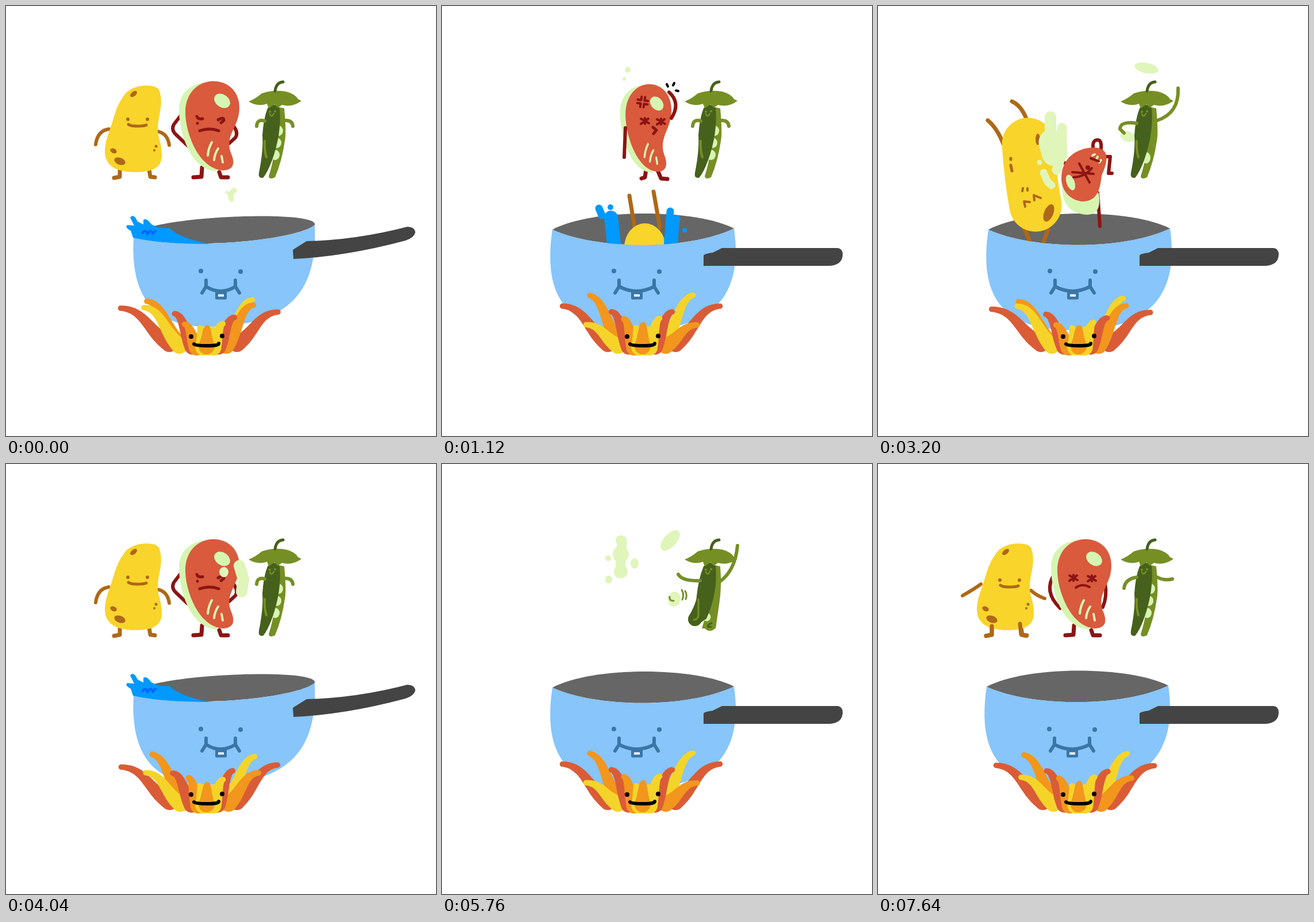
These frames come from a looping animation (748x748 px, 7680 ms). An HTML page with a canvas:

```html
<!DOCTYPE html>
<html lang="en">
<head>
<meta charset="utf-8">
<title>Vegetable soup</title>
<style>
html, body { margin: 0; width: 100%; height: 100%; overflow: hidden; background: #fff; }
canvas { display: block; width: 748px; height: 748px; }
</style>
</head>
<body>
<canvas id="stage" width="748" height="748"></canvas>
<script>
const g = document.getElementById('stage').getContext('2d');
const RED = '#d95a3c', MAROON = '#8b1414', MINT = '#d6f5b1', STEAM = '#e0f5ba';
const YELLOW = '#f9d42b', BROWN = '#ae6817', LEAF = '#768f25', DARK = '#46611b';
const SKY = '#87c5fa', BLUE = '#3a76a6', WATER = '#0099ff';
g.lineCap = g.lineJoin = 'round';

const mix = (a, b, u) => a + (b - a) * u;
const cubic = (a, b, c, d, t) =>
  a * (1 - t) ** 3 + 3 * b * t * (1 - t) ** 2 + 3 * c * t * t * (1 - t) + d * t ** 3;

function fill(color, path) {
  g.fillStyle = color;
  g.fill(new Path2D(path));
}
function line(color, width, path) {
  g.strokeStyle = color;
  g.lineWidth = width;
  g.stroke(new Path2D(path));
}
function dot(color, x, y, rx, ry = rx, deg = 0) {
  g.beginPath();
  g.ellipse(x, y, rx, ry, deg * Math.PI / 180, 0, 7);
  g.fillStyle = color;
  g.fill();
}
function moved(x, y, draw, sx = 1, sy = 1) {
  g.save();
  g.translate(x, y);
  g.scale(sx, sy);
  draw();
  g.restore();
}
// Draw a pose whose centre is (cx, cy) at (x, y), turned by deg
function turned(draw, cx, cy, x, y, deg) {
  g.save();
  g.translate(x, y);
  g.rotate(deg * Math.PI / 180);
  g.translate(-cx, -cy);
  draw();
  g.restore();
}

// ---- Pot: left corner, rim curves, bowl, handle, face ----
const LEVEL = {
  left: 'M192 389', back: 'C260 352 440 352 508 387', front: 'C430 425 270 425 192 389',
  bowl: 'C175 505 215 564 340 564 C470 564 525 505 508 387',
  handle: 'M455 434 Q456 431 471 429 L487 421 H688 Q697 422 697 432 Q697 450 675 452 H455 Z',
  face: [299, 79]
};
const TILT = {
  left: 'M222 402', back: 'C220 366 548 352 537 381', front: 'C500 410 300 425 222 402',
  bowl: 'C215 520 270 557 350 558 C500 557 542 490 537 381',
  handle: 'M499 424 L523 409 Q610 407 698 384 Q711 384 712 394 Q710 403 695 408 Q590 436 500 440 Z',
  face: [339, 69]
};
function face(x, w) {
  const a = x + 9, b = x + w - 9, mid = x + w / 2;
  dot(BLUE, x, 461, 4);
  dot(BLUE, x + w, 462, 4);
  line(BLUE, 6, `M${a} 477 V488 L${a - 7} 499 M${a} 488 Q${mid} 504 ${b} 488 M${b} 477 V488 L${b + 7} 499`);
  g.fillStyle = '#fff';
  g.fillRect(mid - 7, 499, 15, 9);
  g.lineWidth = 5;
  g.strokeRect(mid - 7, 499, 15, 9);
}
function wave(k) {
  fill(WATER, 'M221 403 L217 391 Q206 385 211 381 L223 382 L216 368 Q220 362 225 368 L229 375 L239 380 V372 Q245 368 252 379 Q265 388 284 386 Q300 403 354 414 Q270 414 221 403');
  line('#0066ff', 4, 'M237 395 Q244 387 246 397 Q252 386 255 396 L260 391');
  const fly = k % 31 - 2;
  if (fly > 0 && fly < 4) dot(WATER, 209 - 36 * fly, 372 + fly * fly * 5, 9, 6, -30);
}
function splash() {
  line(WATER, 24, 'M294 368 L299 412 M401 378 L398 412');
  line(WATER, 13, 'M273 352 L278 364 M397 357 L395 380 M408 370 L404 390');
  dot(WATER, 293, 350, 5);
  dot(WATER, 422, 390, 4);
}

// ---- Flames: mirrored tongues, from the outside in ----
const FIRE = ['#d95c37', '#f2961d', '#f5d42a'];
const REACH = [140, 92, 99, 54, 32], TOP = [521, 502, 558, 531, 543];

function tongue(color, reach, top, foot = 588) {
  const tall = foot - top;
  g.beginPath();
  for (let t = 0; t <= 1; t += 1 / 40) {
    const x = 348 + reach * cubic(.42, .67, .7, 1, t);
    const y = cubic(foot, foot - tall * .35, top + Math.max(0, tall - 70) * .3, top, t);
    const r = mix(14, 4.5, t ** .8);
    g.moveTo(x + r, y);
    g.arc(x, y, r, 0, 7);
  }
  g.fillStyle = color;
  g.fill();
}
function fire(k) {
  const lean = (1 + Math.cos(k * Math.PI / 5)) / 2;
  REACH.forEach((reach, i) => {
    const top = TOP[i] - lean * (i === 2 ? 34 : -8);
    for (const side of [-1, 1]) {
      const hue = side > 0 && i % 3 ? 3 - i % 3 : i % 3;
      const flick = 4 * Math.sin(k * 1.9 + i * 2 + side);
      tongue(FIRE[hue], side * (reach + flick * lean) - lean * reach * .11, top + flick * lean, 588 + i * 1.5);
    }
  });
  tongue(FIRE[2], -11, 560, 594);
  tongue(FIRE[2], 12, 562, 594);
  tongue(FIRE[1], 2, 554 + lean * 6, 592);
  dot('#000', 322, 575, 4);
  dot('#000', 376, 574, 4);
  line('#000', 6, 'M327 588 Q330 591 350 591 Q370 591 370 587');
}

// ---- Potato ----
function potato(armsOut) {
  line(BROWN, 6, armsOut
    ? 'M179 209 Q165 219 147 229 M266 220 Q276 229 290 234'
    : 'M179 214 Q159 217 156 241 M263 218 Q281 221 284 242');
  line(BROWN, 7, 'M198 285 V297 L188 299 M249 285 L251 297 L259 298');
  fill(YELLOW, 'M208 152 C224 134 265 135 267 148 C276 175 260 200 265 225 C277 268 275 289 225 289 C162 289 168 250 179 220 C190 190 190 175 208 152');
  dot(BROWN, 222, 153, 7, 4, -40);
  dot(BROWN, 187, 252, 6, 4, 25);
  dot(BROWN, 198, 270, 10, 6, 20);
  dot(BROWN, 261, 244, 2.5);
  dot(BROWN, 258, 251, 2);
  if (armsOut) line(BROWN, 7, 'M198 282 V297 L188 299 M247 278 L249 297 L258 299');
  moved(0, armsOut ? 5 : 0, () => {
    dot(BROWN, 212, 197, 3);
    dot(BROWN, 246, 197, 3);
    line(BROWN, 5, 'M213 206 Q217 209 228 209 Q240 209 244 207');
  });
}
function potatoFlipped() {
  line(BROWN, 7, 'M218 240 Q207 212 191 199 M258 196 Q249 173 233 166 M255 388 L265 411 M296 388 L288 411');
  line(YELLOW, 91, 'M261 240 Q265 300 274 347');
  dot(BROWN, 297, 360, 8, 16, 22);
  dot(BROWN, 278, 232, 4, 10);
  line(BROWN, 5, 'M231 265 V267 M231 277 L233 287');
  line(BROWN, 4, 'M251 322 L252 317 M260 321 V317 M272 338 L271 329 L283 334 M256 349 L254 340 L264 341');
}
function drawPotato(c) {
  if (c < 6) potato(false);
  else if (c < 11) {
    const u = (c - 6) / 5;
    turned(potatoFlipped, 268, 293, mix(222, 345, u), mix(215, 400, u) - 60 * Math.sin(u * Math.PI), mix(180, 360, u));
  } else if (c < 17) {
    moved(0, (c - 14) * (c > 14 ? 18 : 5), () => {
      line(BROWN, 7, 'M326 330 L335 385 M368 323 L379 385');
      dot(YELLOW, 353, 420, 36, 42);
    });
    if (c < 16) splash();
  } else if (c >= 38 && c < 40) moved(-12 * (c - 40), -60 * (c - 40), potatoFlipped);
  else if (c >= 40 && c < 43) {
    const u = (c - 40) / 3;
    turned(potatoFlipped, 268, 293, mix(268, 222, u), mix(293, 215, u), 180 * u);
  } else if (c >= 43) potato(true);
}

// ---- Red bean ----
function cross(x, y) {
  line(MAROON, 4, `M${x - 7} ${y - 5} l14 8 M${x - 7} ${y + 4} l13 -9 M${x} ${y - 6} v10`);
}
function beanBody() {
  fill(MINT, 'M301 180 C301 145 330 132 355 132 L367 288 C320 285 301 220 301 180');
  fill(RED, 'M312 185 C312 114 406 114 406 177 C406 210 380 225 391 255 C400 275 395 285 378 286 C335 284 312 220 312 185');
  dot(MINT, 376, 165, 15, 11, 35);
  line(MINT, 4, 'M358 237 Q352 248 351 260 M369 248 Q363 257 362 268 M375 261 L377 272');
}
function bean(dazed) {
  line(MAROON, 6, dazed
    ? 'M308 190 Q286 221 317 251 M395 208 Q399 230 391 249'
    : 'M308 185 L292 206 Q287 215 295 223 L316 243 M395 208 Q405 220 399 229 L388 239');
  line(MAROON, 7, 'M341 281 L340 297 L326 298 M371 289 L374 298 H386');
  beanBody();
  if (dazed) {
    cross(340, 199);
    cross(372, 200);
    line(MAROON, 4, 'M344 215 Q356 207 368 214');
  } else {
    line(MAROON, 5, 'M332 192 Q334 198 342 196 M369 198 Q379 192 379 199 L374 203 M337 217 Q354 211 370 217');
    dot(MAROON, 333, 204, 2.5);
  }
}
function beanAngry(k) {
  line(MAROON, 7, 'M355 285 L353 298 L347 300 M376 288 L381 300 L392 301');
  moved(54, 8, beanBody, .85, .98);
  line(MAROON, 6, 'M319 212 L317 263 ' + (k % 2 ? 'M396 160 Q415 172 398 195' : 'M395 150 Q416 169 399 195'));
  cross(353, 201);
  cross(381, 202);
  line(MAROON, 5, 'M367 211 L373 216 L368 222');
  for (let i = 0; i < 4; i++) turned(() => line(MAROON, 4, 'M3 -9 V-3 H9'), 0, 0, 349, 167, i * 90 + 8);
  if (k % 2 === 0) line('#000', 4, 'M391 136 l2 4 M404 134 l-2 4 M407 147 l4 1');
}
function beanFlipped() {
  line(MAROON, 6, 'M374 246 Q373 233 382 233 Q391 233 387 256 M395 262 H404 L401 291 H407 M330 275 L325 273 M382 325 L386 383');
  fill(MINT, 'M320 312 L384 325 C389 358 376 363 362 363 C335 361 320 345 320 312');
  fill(RED, 'M319 300 C319 265 345 247 375 246 C405 247 400 270 389 295 C386 325 378 340 355 340 C335 338 319 322 319 300');
  dot(MINT, 335, 307, 7, 14, -20);
  line(MINT, 4, 'M373 260 L377 258 M380 267 L382 262 M385 272 L388 268');
  line(MAROON, 4, 'M338 289 L375 292 M350 274 L368 307 M340 298 Q360 297 372 282 M370 265 L384 270');
  dot(MAROON, 365, 281, 4);
}
function drawBean(c) {
  if (c < 8) bean(false);
  else if (c < 17) beanAngry(Math.floor(c));
  else if (c < 21) {
    const u = (c - 17) / 4;
    turned(beanFlipped, 358, 300, mix(355, 345, u), mix(215, 450, u) - 40 * Math.sin(u * Math.PI), mix(180, 360, u));
  } else if (c >= 38 && c < 40) moved(0, -60 * (c - 40), beanFlipped);
  else if (c >= 40 && c < 43) {
    const u = (c - 40) / 3;
    turned(beanFlipped, 358, 300, 358, mix(300, 215, u), 180 * u);
  } else if (c >= 43) bean(true);
}

// ---- Pea pod ----
function thrownPea(step) {
  const x = 404 - 14 * step, y = 235 + 33 * step + 3 * step * step;
  dot(STEAM, x, y, 11, 13, 15);
  line(LEAF, 3, `M${x - 8} ${y - 4} q-1 7 7 7`);
  if (step < 2) line(LEAF, 3, `M${x + 13} ${y - 16} q5 8 1 17 M${x + 19} ${y - 14} q4 7 1 14`);
}
function drawPod(k) {
  const dancing = k >= 20 && k < 34, juggling = k >= 34 && k < 43, odd = k % 2;
  let arms = 'M450 200 Q437 196 436 209 M484 199 Q498 198 499 209';
  if (k >= 43) arms = 'M450 197 Q430 200 428 216 M484 196 Q498 204 512 200';
  if (juggling) arms = 'M450 204 Q421 200 421 214 L428 221 M486 199 Q524 186 522 143';
  if (dancing) arms = odd
    ? 'M414 172 Q419 204 448 203 M485 203 Q501 192 506 135'
    : 'M411 192 Q418 204 449 203 M484 204 Q510 185 514 142';

  if (dancing) {
    const bend = odd ? 0 : 14, step = (k - 18) % 6;
    if (step < 5) thrownPea(step);
    if (step === 0) dot(STEAM, 397, 133, 22, 11, -48);
    fill(LEAF, `M470 175 L484 178 Q487 215 482 245 L476 ${272 + bend} H452 Q470 230 470 175`);
    dot(LEAF, 473 - bend / 2, 268 + bend * .8, 11);
    dot(MINT, 453 + bend / 2, 266, 11 - bend / 4);
    line(DARK, 3, `M${476 - bend / 2} ${263 + bend} q-8 2 -6 7 l5 -1`);
    fill(DARK, `M455 178 Q465 165 476 178 Q480 225 460 ${255 + bend} L441 ${268 + bend} L430 ${250 + bend} Q443 240 443 230 Q446 200 455 178`);
    dot(DARK, 440, 256 + bend, 12);
    line(LEAF, 3, `M446 235 V${250 + bend} q-2 7 -8 7`);
  } else {
    fill(LEAF, 'M470 175 L484 178 Q488 220 485 235 Q480 270 468 298 Q458 303 457 296 Q472 250 468 200 Z');
    if (juggling) {
      dot(STEAM, 434, 227, 13, 9, 20);
      if (!odd) dot(STEAM, 467, 108, 21, 9, 12);
      dot(MINT, 466, 264, 8, 10);
    } else for (let i = 0; i < 3; i++) dot(MINT, 474 - i * 3, 217 + i * 21, 8, 9);
    fill(DARK, 'M455 178 Q465 165 476 178 Q480 220 463 268 Q455 290 447 299 Q438 300 440 290 Q448 250 446 225 Q448 195 455 178');
    line(LEAF, 4, 'M450 235 Q449 251 453 263');
  }
  line(LEAF, 6, arms);
  fill(LEAF, 'M422 166 Q433 162 445 152 Q466 145 488 149 Q503 153 508 162 L514 165 Q498 177 480 172 L473 177 L467 171 L457 178 L454 170 Q438 176 422 166');
  line(DARK, 5, 'M468 148 Q470 133 482 132');
  dot(LEAF, 459, 184, 2);
  dot(LEAF, 468, 183, 2);
  line(LEAF, 2.5, 'M459 188 Q462 195 466 187');
}

// ---- Steam: puffs swell into plumes, then break up ----
function puff() {
  dot(STEAM, 384, 324, 2.5);
  line(STEAM, 9, 'M397 321 L390 327 L392 336');
}
function plume(wide) {
  line(STEAM, 20, 'M300 193 V230');
  line(STEAM, 45, 'M302 237 L307 256');
  line(STEAM, 17, 'M320 212 V255 L311 285');
  line(STEAM, 13, 'M288 290 L295 306 L302 312');
  if (wide) line(STEAM, 17, 'M343 212 L329 248');
  dot(STEAM, 281, 272, 4.5);
}
function wisps() {
  line(STEAM, 17, 'M313 133 L310 188');
  for (const [y, r] of [[133, 9], [157, 14], [187, 12]]) dot(STEAM, 311, y, r);
  dot(STEAM, 289, 164, 5);
  dot(STEAM, 335, 173, 7, 9);
  dot(STEAM, 290, 201, 6, 7);
}
function scraps() {
  line(STEAM, 20, 'M406 177 L413 200 L410 222');
  dot(STEAM, 379, 188, 8, 9);
}
function specks() {
  dot(STEAM, 323, 111, 5);
  dot(STEAM, 317, 127, 3);
}
function steam(n) {
  const s = n % 15;
  if (n > 91) return;
  if (s < 2) moved(0, -12 * s, puff);
  else if (s < 5) moved(95, 12 * (3 - s), () => plume(n % 2));
  else if (s < 7) moved(0, 30 * (5 - s), scraps);
  else if (s < 8) moved(85, 0, specks);
  else if (s < 9) moved(-95, 0, puff);
  else if (s < 12) moved(0, 22 * (10 - s), () => plume(n % 2));
  else if (s < 14) moved(0, 15 * (12 - s), wisps);
  else specks();
}

function draw(now) {
  const t = now % 7680, n = Math.floor(t / 80), k = n % 48;
  const c = Math.floor(t % 3840 / 40) / 2;
  const tilted = k < 7 || k >= 31 && k < 38;
  const pot = tilted ? TILT : LEVEL;
  const swing = k === 1 || k === 33 ? 27 : 0;
  const wobble = !tilted && k % 2 ? -3 : 0;
  g.fillStyle = '#fff';
  g.fillRect(0, 0, 748, 748);
  moved(swing + wobble, wobble / 2, () => fill('#666', pot.left + pot.back + pot.front));
  drawPod(k);
  drawBean(c);
  drawPotato(c);
  moved(swing, 0, () => {
    moved(wobble, wobble / 2, () => fill(SKY, pot.left + pot.bowl + pot.front));
    moved(wobble / 3, 0, () => face(...pot.face));
    fill('#444', pot.handle);
    if (tilted) wave(k);
  });
  fire(k);
  steam(n);
}

const start = performance.now();
function loop() {
  draw(performance.now() - start);
  requestAnimationFrame(loop);
}
loop();
</script>
</body>
</html>
```
